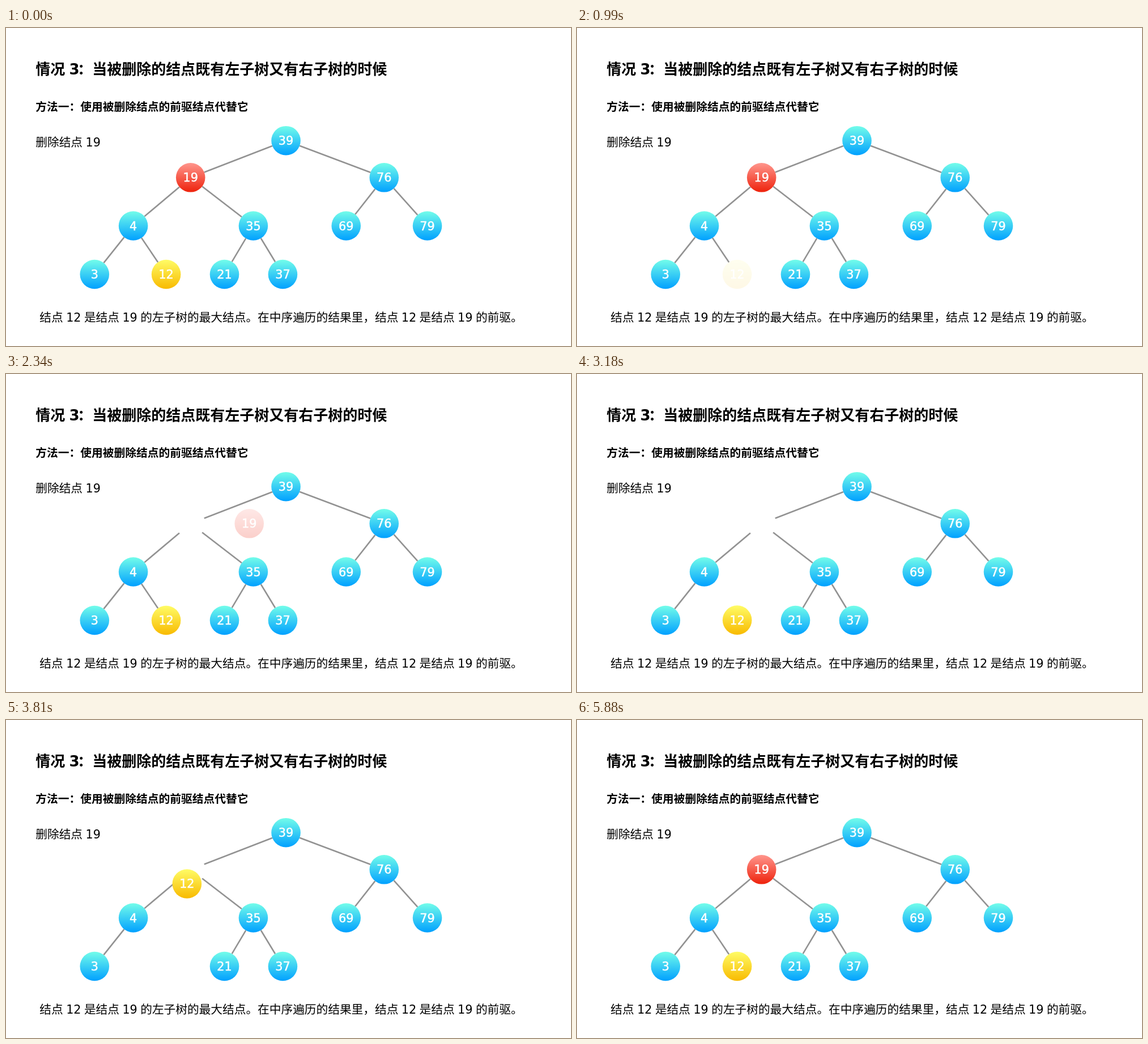
An HTML page that plays this animation: 997 by 561 pixels, repeating every 5.91 s.

```html
<!DOCTYPE html>
<html lang="zh-CN">
<head>
<meta charset="utf-8">
<style>
  html, body { margin: 0; width: 100%; height: 100%; overflow: hidden; background: #fff; }
  svg { display: block; }
  text { font: 20.7px "DejaVu Sans", "Noto Sans CJK SC", "Noto Sans CJK", sans-serif; word-spacing: -.054em; }
  .title { font-size: 26px; font-weight: bold; }
  .method { font-size: 19.75px; font-weight: bold; }
  .node text { fill: #fff; stroke: #fff; stroke-width: .5; text-anchor: middle; }
  line { stroke: #929292; stroke-width: 2.6; }
</style>
</head>
<body>
<svg width="997" height="561" viewBox="0 0 997 561">
  <defs id="defs"></defs>
  <text class="title" x="52.3" y="82.2">情况<tspan x="111.5">3</tspan><tspan x="126.3">：当被删除的结点既有左子树又有右子树的时候</tspan></text>
  <text class="method" x="52.3" y="146.3">方法一：使用被删除结点的前驱结点代替它</text>
  <text x="52.3" y="209.3">删除结点 19</text>
  <text x="59.3" y="518.4">结点 12 是结点 19 的左子树的最大结点。在中序遍历的结果里，结点 12 是结点 19 的前驱。</text>
  <g id="edges"></g>
  <g id="nodes"></g>
</svg>
<script>
const LOOP = 5910, STEP = 30, RADIUS = 25.8;
const gradients = {
  blue: ['#73fdea', '#00a0ff'],
  red: ['#ff968d', '#ee220c'],
  yellow: ['#fffc66', '#f8ba00']
};
const points = {
  39: [494, 198.7], 19: [325.7, 263.8], 76: [667.2, 263.8],
  4: [224.6, 349], 35: [436.4, 349], 69: [600.2, 349], 79: [743.5, 349],
  3: [156.3, 434.5], 12: [282.6, 434.5], 21: [385.5, 434.5], 37: [488.4, 434.5]
};
const links = [[39, 19], [39, 76], [19, 4], [19, 35], [76, 69], [76, 79], [4, 3], [4, 12], [35, 21], [35, 37]];

function add(parent, tag, attrs, text = '') {
  const el = document.createElementNS('http://www.w3.org/2000/svg', tag);
  for (const key in attrs) el.setAttribute(key, attrs[key]);
  el.textContent = text;
  return parent.appendChild(el);
}

const [defs, edgeLayer, nodeLayer] = ['defs', 'edges', 'nodes'].map(id => document.getElementById(id));

for (const id in gradients) {
  const gradient = add(defs, 'linearGradient', { id, x2: 0, y2: 1 });
  gradients[id].forEach((color, offset) => add(gradient, 'stop', { offset, 'stop-color': color }));
}

// Edges run from rim to rim, so they stop short where a node is missing.
const edges = links.map(([from, to]) => {
  const [x1, y1] = points[from], [x2, y2] = points[to];
  const k = RADIUS / Math.hypot(x2 - x1, y2 - y1);
  const dx = (x2 - x1) * k, dy = (y2 - y1) * k;
  return add(edgeLayer, 'line', { x1: x1 + dx, y1: y1 + dy, x2: x2 - dx, y2: y2 - dy });
});
const looseEdge = edges[7];

const nodes = {};
for (const key of [...Object.keys(points).filter(k => k !== '12'), '12']) {
  const fill = { 19: 'red', 12: 'yellow' }[key] || 'blue';
  const node = nodes[key] = add(nodeLayer, 'g', { class: 'node' });
  add(node, 'circle', { r: RADIUS, fill: `url(#${fill})` });
  add(node, 'text', { y: 7.5 }, key);
  place(key, 0, 0, 1);
}

function place(key, dx, dy, opacity) {
  const [x, y] = points[key];
  nodes[key].setAttribute('transform', `translate(${x + dx} ${y + dy})`);
  nodes[key].setAttribute('opacity', opacity);
}

const progress = (t, start, end) => Math.min(1, Math.max(0, (t - start) / (end - start)));

// cubic-bezier(.42, 0, .58, 1)
function easeInOut(p) {
  let low = 0, high = 1;
  for (let i = 0; i < 24; i++) {
    const u = (low + high) / 2, v = 1 - u;
    if (1.26 * v * v * u + 1.74 * v * u * u + u * u * u < p) low = u; else high = u;
  }
  return low * low * (3 - 2 * low);
}

function draw(t) {
  if (t >= 5880) t = 0;

  const blink = progress(t, 450, 1350);
  const move = easeInOut(progress(t, 3150, 4050));
  const [x1, y1] = points[12], [x2, y2] = points[19];
  place(12, (x2 - x1) * move, (y2 - y1) * move, (1 + Math.cos(2 * Math.PI * blink)) / 2);

  const leave = Math.max(0, t - 1800);
  const fade = t < 2460 ? 1 - leave / 685 : 0;
  place(19, 103.5 * (leave / 540) ** 2.8, 0, fade);

  looseEdge.setAttribute('visibility', t < 3180 ? 'visible' : 'hidden');
}

const begin = performance.now();
function tick() {
  const t = (performance.now() - begin) % LOOP;
  draw(Math.floor(t / STEP) * STEP);
  requestAnimationFrame(tick);
}
tick();
</script>
</body>
</html>
```
